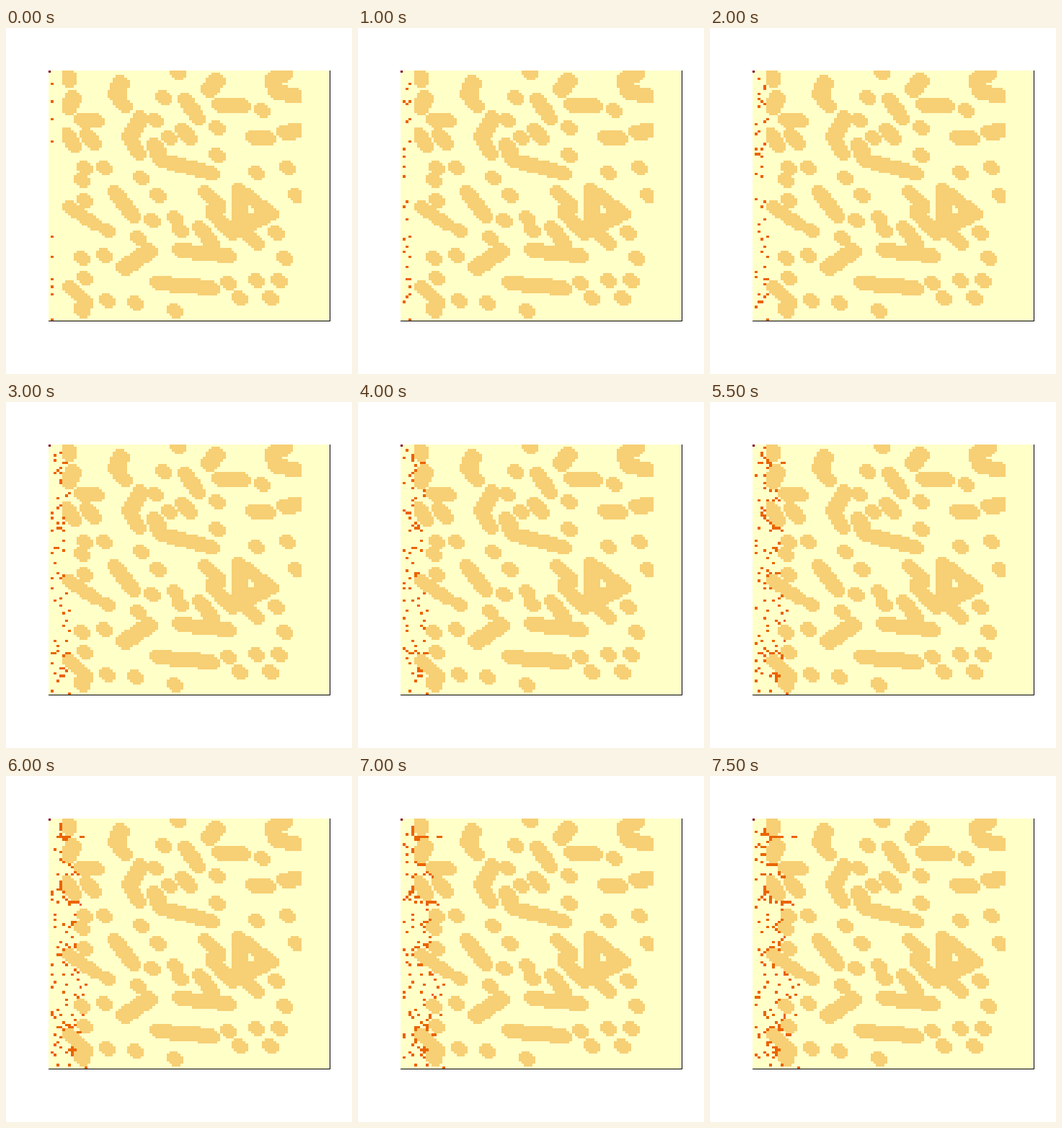
A matplotlib script for the animation above (8000 ms loop, 480x480 px).

```python
import random

import matplotlib.pyplot as plt
import numpy as np
from matplotlib.animation import FuncAnimation

SIZE, N, STEPS = 480, 100, 16
LEFT, TOP, WIDTH, HEIGHT = 59.04, 59.04, 390.72, 347.52
FIRST, LAST = 5, 89          # columns that hold obstacles
RADIUS = 2.57
START_ROWS = [5, 12, 19, 28, 66, 74, 83, 86, 89, 99]

GROUND, ROCK, WALKER, CORNER = range(4)
COLORS = np.array([(255, 255, 200), (247, 207, 116), (235, 99, 0),
                   (125, 0, 37)], dtype=np.uint8)

# Key points as (column, row): lone rocks, and ridges swept between points.
SPOTS = [
    (37, 19), (42, 26), (40, 10), (45, 0), (59, 22), (59, 33), (75, 15),
    (12, 38), (19, 38), (11, 43), (73, 40), (84, 38), (87, 49), (32, 42),
    (12, 51), (38, 49), (36, 59), (44, 58), (20, 63), (31, 66), (46, 63),
    (80, 64), (11, 74), (19, 73), (83, 74), (12, 82), (20, 91), (30, 92),
    (44, 95), (63, 84), (73, 83), (67, 90), (81, 83), (78, 90),
]
RIDGES = [
    (6, 1, 6, 3), (8, 10, 6, 14), (11, 19, 16, 19), (6, 25, 8, 29),
    (13, 25, 15, 28), (25, 4, 23, 9, 26, 13), (32, 18, 28, 26, 31, 32),
    (37, 29, 39, 35, 57, 40), (47, 23, 49, 26), (48, 11, 52, 18),
    (59, 3, 56, 7), (60, 13, 68, 13), (83, 0, 79, 3, 80, 8, 87, 9),
    (72, 26, 77, 26), (83, 24, 88, 23), (23, 48, 29, 57), (7, 54, 15, 60),
    (55, 48, 59, 52, 58, 57, 64, 64), (53, 62, 57, 68), (46, 71, 63, 73),
    (67, 62, 67, 47, 78, 56, 67, 62, 73, 68), (26, 78, 35, 71),
    (7, 86, 12, 91, 11, 95), (38, 84, 57, 86),
]


def stroke(path):
    """Mask of a polyline drawn with two round tips, one cell apart."""
    pts = np.array(path, dtype=float).reshape(-1, 2)
    if len(pts) == 1:
        pts = np.repeat(pts, 2, axis=0)
    row, col = np.mgrid[:N, :N]
    mask = np.zeros((N, N), dtype=bool)
    for tip in (0, 1):
        for (x0, y0), (x1, y1) in zip(pts[:-1] + tip, pts[1:] + tip):
            dx, dy = x1 - x0, y1 - y0
            length2 = dx * dx + dy * dy or 1
            t = np.clip(((col - x0) * dx + (row - y0) * dy) / length2, 0, 1)
            mask |= np.hypot(col - x0 - t * dx, row - y0 - t * dy) <= RADIUS
    return mask


def make_terrain():
    rock = np.any([stroke(path) for path in SPOTS + RIDGES], axis=0)
    rock[:, :FIRST] = False
    rock[:, LAST + 1:] = False
    grid = np.where(rock, ROCK, GROUND)
    grid[0, 0] = CORNER
    return grid


def slide(col, row, terrain, rng):
    """Direction along the column, mostly towards the nearest opening."""
    openings = np.flatnonzero(terrain[:, col + 1] == GROUND)
    target = openings[np.argmin(abs(openings - row))]
    if target == row:
        return rng.choice((-1, 1))
    toward = 1 if target > row else -1
    return toward if rng.random() < 0.75 else -toward


def advance(walkers, terrain, rng):
    """Walk right; when blocked, slide along the column or wait."""
    taken = set(walkers)

    def is_free(cell):
        col, row = cell
        return (0 <= row < N and terrain[row, col] == GROUND
                and cell not in taken)

    moved = []
    for col, row in sorted(walkers, reverse=True):
        taken.discard((col, row))
        options = [(col + 1, row), (col, row + slide(col, row, terrain, rng))]
        cell = next((c for c in options if is_free(c)), (col, row))
        taken.add(cell)
        moved.append(cell)
    return moved


def simulate(terrain):
    rng = random.Random(11)
    walkers = [(1, row) for row in START_ROWS]
    states = [walkers]
    for _ in range(STEPS - 1):
        walkers = advance(walkers, terrain, rng)
        entering = [(1, row) for row in rng.sample(range(2, N - 1), 9)]
        walkers += [w for w in entering if w not in walkers]
        states.append(walkers)
    return states


def cell_index(start, length):
    """First pixel of the grid and the cell under each pixel after it."""
    edges = np.floor(start + np.arange(N + 1) * length / N)
    pixels = np.arange(edges[0], edges[-1])
    return int(edges[0]), np.searchsorted(edges, pixels, side="right") - 1


X0, COLS = cell_index(LEFT, WIDTH)
Y0, ROWS = cell_index(TOP, HEIGHT)
X1, Y1 = X0 + len(COLS), Y0 + len(ROWS)

terrain = make_terrain()
states = simulate(terrain)


def render(step):
    grid = terrain.copy()
    for col, row in states[step]:
        grid[row, col] = WALKER
    image = np.full((SIZE, SIZE, 3), 255, dtype=np.uint8)
    image[Y0:Y1, X0:X1] = COLORS[grid[np.ix_(ROWS, COLS)]]
    image[Y0:Y1 + 1, X1] = 0
    image[Y1, X0:X1 + 1] = 0
    return image


fig = plt.figure(figsize=(SIZE / 100, SIZE / 100), dpi=100)
ax = fig.add_axes([0, 0, 1, 1])
ax.axis("off")
picture = ax.imshow(render(0), interpolation="nearest", aspect="auto")


def update(step):
    picture.set_data(render(step))
    return [picture]


anim = FuncAnimation(fig, update, frames=STEPS, interval=500,
                     repeat=True, repeat_delay=0, blit=False)
plt.show()
```
